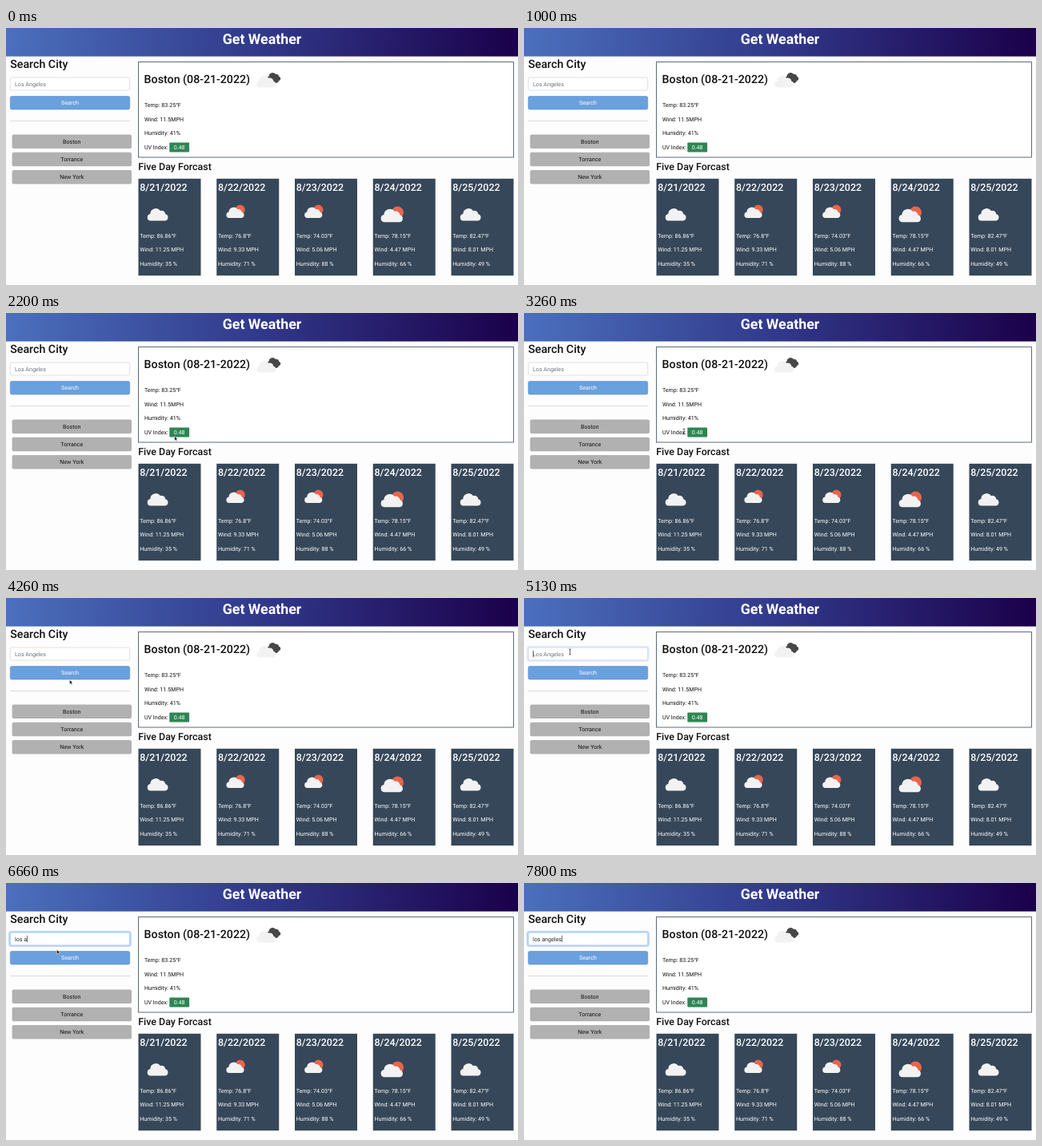
An HTML page that plays this animation: 640x322 px, repeating every 8 s.

```html
<!DOCTYPE html>
<html lang="en">
<head>
<meta charset="utf-8">
<title>Get Weather</title>
<style>
  html, body { margin: 0; width: 100%; height: 100%; overflow: hidden; background: #fdfdfd; }
  svg { display: block; width: 100vw; height: 100vh; }
  text { font: 7.11px Roboto, sans-serif; fill: #111; text-rendering: geometricPrecision; white-space: pre; }
  .h1 { font-size: 17.8px; font-weight: 700; }
  .h2 { font-size: 14.22px; font-weight: 500; }
  .h3 { font-size: 12.44px; font-weight: 500; }
  .mid { text-anchor: middle; }
  .light { fill: #fff; }
</style>
</head>
<body>
<svg id="stage" viewBox="0 0 640 322">
  <defs>
    <linearGradient id="bar" x1="0" y1="0" x2="640" y2="36" gradientUnits="userSpaceOnUse">
      <stop offset="0" stop-color="#4b70bd"/>
      <stop offset=".5" stop-color="#31388a"/>
      <stop offset="1" stop-color="#1b004a"/>
    </linearGradient>
    <path id="cloud" d="M4.4 17A4.4 4.4 0 0 1 4 8.3A7 7 0 0 1 16.6 4.3A5 5 0 0 1 23 8.6A4.3 4.3 0 0 1 22.6 17Z"/>
  </defs>
  <rect width="640" height="322" fill="#fdfdfd"/>
  <rect width="640" height="35.6" fill="url(#bar)"/>
  <g id="page"></g>
  <g id="field">
    <rect id="ring" x="4.1" y="60.8" width="151.8" height="18.4" rx="2.8" fill="none" stroke="#0d6efd" stroke-opacity=".28" stroke-width="1.8"/>
    <rect id="box" x="5.3" y="62" width="149.4" height="16" rx="1.9" fill="#fff" stroke-width=".7"/>
    <text id="entry" x="11" y="72.6"></text>
    <rect id="caret" y="65.8" width=".6" height="8.4" fill="#111"/>
  </g>
  <g id="pointer">
    <path id="arrow" d="M0 0V5.6L1.4 4.4L2.3 6.5L3.2 6.1L2.3 4.1H4.1Z" fill="#111" stroke="#fff" stroke-width=".5"/>
    <path id="beam" d="M-1.4 -3.6Q0 -3.6 0 -2.8Q0 -3.6 1.4 -3.6M0 -2.8V2.8M-1.4 3.6Q0 3.6 0 2.8Q0 3.6 1.4 3.6" fill="none" stroke="#222" stroke-width=".7"/>
  </g>
</svg>
<script>
const $ = id => document.getElementById(id);
const LOOP = 8000, STEP = 200 / 3;

const text = (x, y, s, cls = '') => `<text x="${x}" y="${y}" class="${cls}">${s}</text>`;
const rect = (x, y, w, h, fill, rest = '') =>
  `<rect x="${x}" y="${y}" width="${w}" height="${h}" fill="${fill}" ${rest}/>`;
const cloud = (x, y, k, fill = '#f2f2f2') =>
  `<use href="#cloud" transform="translate(${x} ${y}) scale(${k})" fill="${fill}"/>`;
const sun = (x, y, r) => `<circle cx="${x}" cy="${y}" r="${r}" fill="#e9654b"/>`;

const icons = {
  cloud: x => cloud(x + 10.8, 224.6, 1),
  sunny: x => sun(x + 29.4, 227.7, 6.1) + cloud(x + 11.8, 223.4, .86),
  sunnyBig: x => sun(x + 30.7, 231, 7.6) + cloud(x + 9.4, 225.2, 1.06)
};

const days = [
  [21, '86.86', '11.25', 35, 'cloud'],
  [22, '76.8', '9.33', 71, 'sunny'],
  [23, '74.03', '5.06', 88, 'sunny'],
  [24, '78.15', '4.47', 66, 'sunnyBig'],
  [25, '82.47', '8.01', 49, 'cloud']
];

function card([day, temp, wind, humidity, icon], i) {
  const x = 165.5 + i * 97.75, tx = x + 1.7;
  return rect(x, 188.8, 78, 121.4, '#364759') +
    text(tx, 203.9, `8/${day}/2022`, 'h3 light') + icons[icon](x) +
    text(tx, 262.6, `Temp: ${temp}°F`, 'light') +
    text(tx, 280.4, `Wind: ${wind} MPH`, 'light') +
    text(tx, 298.2, `Humidity: ${humidity} %`, 'light');
}

const city = (name, i) =>
  rect(7.6, 133.5 + i * 22.2, 149.4, 17.5, '#b1b1b1', 'rx="2"') +
  text(82.3, 144.8 + i * 22.2, name, 'mid');

$('page').innerHTML =
  text(320, 20.2, 'Get Weather', 'h1 mid light') +
  text(5.2, 50.4, 'Search City', 'h2') +
  rect(5.3, 85.6, 149.4, 16.4, '#6aa0de', 'rx="2" stroke="#4f8bd0" stroke-width=".6"') +
  text(80, 96.3, 'Search', 'mid light') +
  rect(5, 116.2, 150, .6, '#c4c4c4') +
  ['Boston', 'Torrance', 'New York'].map(city).join('') +
  rect(165.5, 42.6, 469, 119.4, '#fff', 'stroke="#36475a" stroke-width=".8"') +
  text(172.6, 69.3, 'Boston (08-21-2022)', 'h2') +
  cloud(326, 55, .66, '#47474a') + rect(333, 60, 8, 9, '#47474a', 'rx="4"') +
  cloud(312.8, 58.6, .94) +
  text(172.9, 98.7, 'Temp: 83.25°F') +
  text(172.9, 116.5, 'Wind: 11.5MPH') +
  text(172.9, 134.3, 'Humidity: 41%') +
  text(172.9, 152.1, 'UV Index:') +
  rect(204.3, 143.4, 24.8, 12.2, '#2e8654', 'rx="1"') +
  text(216.6, 152.1, '0.48', 'mid light') +
  text(165.2, 178.4, 'Five Day Forcast', 'h3') +
  days.map(card).join('');

// pointer stops: time, x, y
const path = [
  [1270, 266, 216], [1660, 243, 172], [1930, 243, 172], [2330, 200, 148.5], [3800, 200, 148.5],
  [4260, 79.5, 102.5], [4660, 57.5, 67.5], [5200, 57.5, 67.5], [5530, 63.5, 83.5]
];
const beams = [[1600, 1930], [2260, 3860], [4530, 5330]];
const query = 'los angeles';
const keys = [5860, 6060, 6260, 6400, 6660, 6800, 7000, 7200, 7330, 7460, 7800];
const show = (id, on) => $(id).setAttribute('visibility', on ? 'visible' : 'hidden');

function position(t) {
  const i = path.findIndex(p => p[0] > t);
  if (i < 0) return path[path.length - 1].slice(1);
  if (i === 0) return path[0].slice(1);
  const [t0, x0, y0] = path[i - 1], [t1, x1, y1] = path[i];
  const u = (t - t0) / (t1 - t0), e = u * u * (3 - 2 * u);
  return [x0 + (x1 - x0) * e, y0 + (y1 - y0) * e];
}

function render(ms) {
  const t = Math.floor((ms + 10) / STEP) * STEP;
  const typed = query.slice(0, keys.filter(k => k <= t).length);
  const focus = Math.min(1, Math.max(0, (t - 5060) / 200));

  $('entry').textContent = typed || 'Los Angeles';
  $('entry').style.fill = typed ? '#212529' : '#6c757d';
  $('ring').setAttribute('opacity', focus);
  const mix = (a, b) => Math.round(a + (b - a) * focus);
  $('box').setAttribute('stroke', `rgb(${mix(206, 134)},${mix(212, 183)},${mix(218, 254)})`);

  const end = typed ? $('entry').getSubStringLength(0, typed.length) : 0;
  $('caret').setAttribute('x', 11 + end);
  show('caret', typed || (t >= 5060 && t < 5560));

  const visible = t >= 1330 && t < 6800;
  const beam = beams.some(([a, b]) => t >= a && t < b);
  $('pointer').setAttribute('transform', `translate(${position(t)})`);
  show('arrow', visible && !beam);
  show('beam', visible && beam);
}

const start = performance.now();
function tick() {
  render((performance.now() - start) % LOOP);
  requestAnimationFrame(tick);
}
tick();
</script>
</body>
</html>
```
